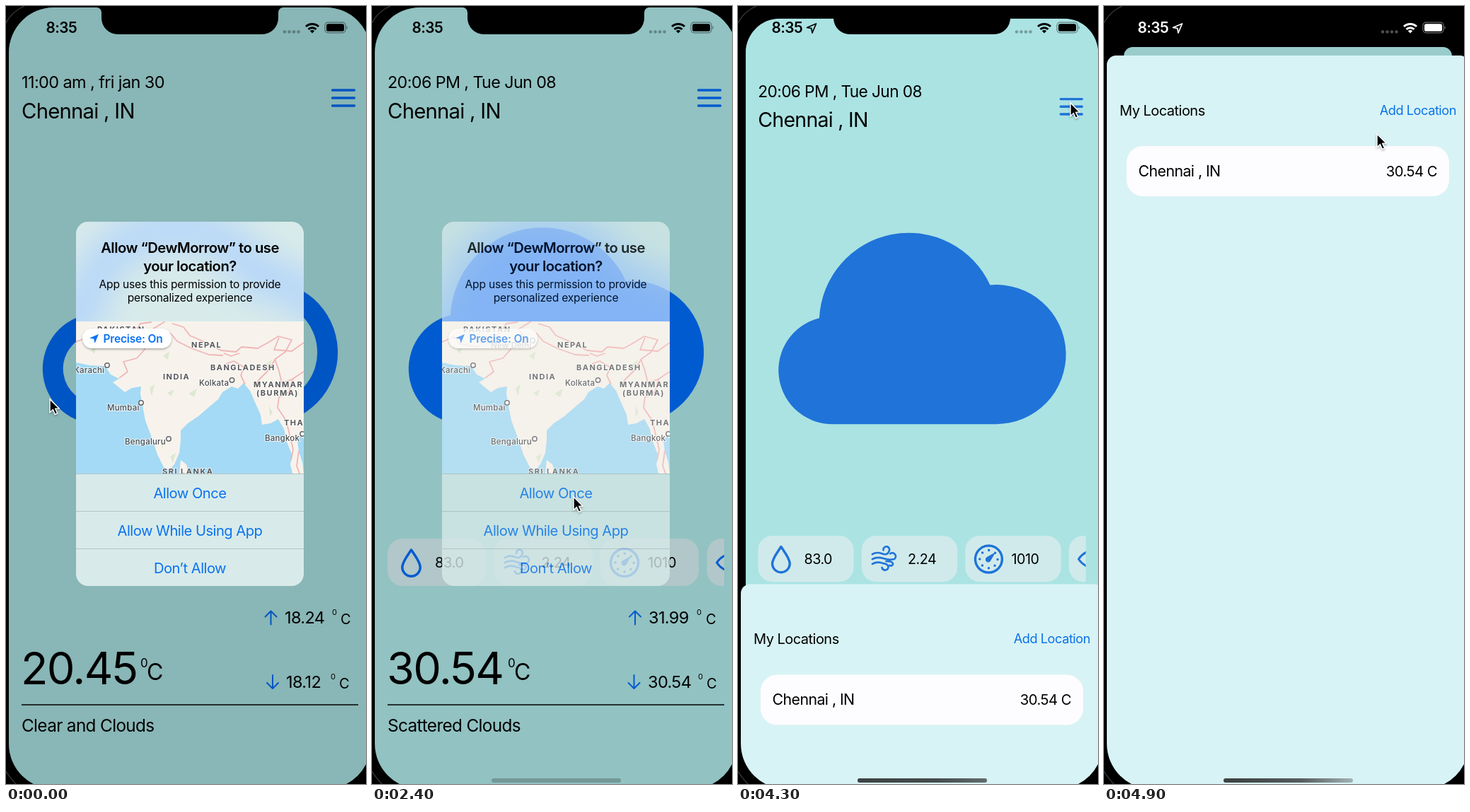
Write an HTML page that moves like this. It is 509 px wide and 1100 px high and loops after 5 s.

```html
<!DOCTYPE html>
<html lang="en">
<head>
<meta charset="utf-8">
<title>Weather app</title>
<style>
  html, body { margin: 0; width: 100%; height: 100%; overflow: hidden; background: #000; }
  svg { display: block; width: 509px; height: 1100px; font-family: Inter, sans-serif; --tint: #006fff; }
  text { letter-spacing: -.026em; white-space: pre; }
  .semi { font-weight: 600; }
  .mid { text-anchor: middle; }
  .end { text-anchor: end; }
  .small text, text.small { letter-spacing: -.012em; }
  .line { fill: none; stroke: var(--tint); stroke-linecap: round; stroke-linejoin: round; }
  .fill { fill: var(--tint); }
  .country text { font: 700 11px Inter, sans-serif; letter-spacing: 1.5px; fill: #55575a; }
  .city text { font: 500 11.5px Inter, sans-serif; letter-spacing: .2px; fill: #4b4d50; }
  .halo text { paint-order: stroke; stroke: #fff; stroke-opacity: .75; stroke-width: 2px; }
</style>
</head>
<body>
<svg viewBox="0 0 509 1100">
  <defs>
    <path id="cloud" d="M133 591A78.2 78.2 0 0 1 111 437A130 130 0 0 1 359 389A101.200 101.200 0 1 1 367 591Z"/>
    <clipPath id="cloudClip"><use href="#cloud"/></clipPath>
    <clipPath id="screenClip"><rect x="4" y="2" width="512" height="1105" rx="64"/></clipPath>
    <clipPath id="pageClip"><rect id="pageShape" x="4" y="2" width="512" height="1105"/></clipPath>
    <clipPath id="chipClip"><rect x="22" y="750" width="476" height="75"/></clipPath>
    <clipPath id="alertClip"><rect x="99" y="305" width="322" height="515" rx="17"/></clipPath>
    <clipPath id="headClip"><rect x="99" y="305" width="322" height="141"/></clipPath>
    <clipPath id="mapClip"><rect x="99" y="446" width="322" height="215"/></clipPath>
    <filter id="blur" x="-30%" y="-30%" width="160%" height="160%"><feGaussianBlur stdDeviation="26"/></filter>
    <filter id="shade" x="-50%" y="-50%" width="200%" height="200%"><feDropShadow dx="0" dy="1.5" stdDeviation="1.5" flood-opacity=".35"/></filter>
    <linearGradient id="barFade"><stop stop-color="#3c4142"/><stop offset=".6" stop-color="#565c5d"/><stop offset="1" stop-color="#a3b3b5"/></linearGradient>
    <path id="arrow" d="M0 20V1M-8 9L0 1L8 9" class="line" stroke-width="2"/>
    <path id="compass" d="M13 0L7.5 13L6.3 6.7L0 5.5Z"/>
  </defs>

  <rect width="509" height="1100"/>
  <path d="M0 24Q8 8 26 0M0 1082Q6 1092 14 1100" fill="none" stroke="#3a3a3a" stroke-width="1.2"/>

  <g id="page"><g clip-path="url(#pageClip)">
    <rect x="4" y="2" width="512" height="1105" fill="#b2ecec"/>
    <path class="line" stroke-width="3.4" d="M461.500 119H492.500M461.500 130H492.500M461.500 141H492.500"/>
    <text x="22" y="159" font-size="29.300">Chennai , IN</text>
    <path d="M22 988H498" stroke="#000" stroke-width="1.5"/>

    <g id="before">
      <g clip-path="url(#cloudClip)"><use href="#cloud" class="line" stroke-width="58"/></g>
      <text x="22" y="116" font-size="23.500">11:00 am , fri jan 30</text>
      <text x="21" y="958.500" font-size="63">20.45</text>
      <text x="190" y="935" font-size="17">0</text><text x="199" y="953" font-size="32">C</text>
      <use href="#arrow" x="374.500" y="854.500"/>
      <text x="394" y="873" font-size="23.500">18.24</text>
      <text x="461" y="861" font-size="11">0</text><text x="473" y="874" font-size="20">C</text>
      <use href="#arrow" transform="translate(377 966) scale(1 -1)"/>
      <text x="396" y="964" font-size="23.500">18.12</text>
      <text x="459" y="952" font-size="11">0</text><text x="471" y="965" font-size="20">C</text>
      <text x="22" y="1026" font-size="24.300">Clear and Clouds</text>
    </g>

    <g id="after">
      <use href="#cloud" class="fill"/>
      <text x="22" y="116" font-size="23.300">20:06 PM , Tue Jun 08</text>
      <text x="21" y="958.500" font-size="63">30.54</text>
      <text x="192" y="935" font-size="17">0</text><text x="201" y="953" font-size="32">C</text>
      <use href="#arrow" x="372" y="854.500"/>
      <text x="391" y="873" font-size="23.500">31.99</text>
      <text x="459" y="861" font-size="11">0</text><text x="472" y="874" font-size="20">C</text>
      <use href="#arrow" transform="translate(370.500 966) scale(1 -1)"/>
      <text x="390" y="964" font-size="23.500">30.54</text>
      <text x="461" y="952" font-size="11">0</text><text x="473" y="965" font-size="20">C</text>
      <text x="22" y="1026" font-size="24.300">Scattered Clouds</text>
      <g clip-path="url(#chipClip)" font-size="20.300">
        <g fill="#d8f3f5">
          <rect x="22" y="753" width="139" height="67" rx="21"/>
          <rect x="172.500" y="753" width="139" height="67" rx="21"/>
          <rect x="323" y="753" width="139" height="67" rx="21"/>
          <rect x="473.500" y="753" width="139" height="67" rx="21"/>
        </g>
        <text x="89" y="794">83.0</text><text x="239.500" y="794">2.24</text><text x="390" y="794">1010</text>
        <path class="line" stroke-width="3.500" d="M55.500 769C51 776 42.800 786 42.800 793.500A12.700 12.700 0 0 0 68.200 793.500C68.200 786 60 776 55.500 769Z"/>
        <path class="line" stroke-width="2.700" d="M188 780Q194 776 202 779T212 776A4.500 4.500 0 1 0 204 774M188 787Q195 783 204 786T220 787A5 5 0 1 0 214 779M188 794Q195 790 203 793C214 794 213 803 206 803Q202 802 202 799M208 790Q218 790 218 794A3 3 0 0 1 213 796"/>
        <circle class="line" cx="357" cy="787" r="19.500" stroke-width="3.500"/>
        <circle class="line" cx="357" cy="787" r="13" stroke-width="3.600" stroke-dasharray="0 10.210" transform="rotate(90 357 787)"/>
        <path class="fill" d="M367 777L360 789A4 4 0 1 1 354.500 784Z"/>
        <path class="line" stroke-width="3" d="M507 774Q494 777 487.500 787Q494 797 507 800"/>
      </g>
    </g>
    <rect id="pageDim" x="4" y="2" width="512" height="1105"/>
  </g></g>

  <g clip-path="url(#screenClip)">
    <g id="sheet">
      <rect x="4" width="512" height="1200" rx="13" fill="#d8f3f5"/>
      <text x="22" y="85" font-size="20">My Locations</text>
      <text x="498" y="84" font-size="18.200" class="end" fill="#0a72e8">Add Location</text>
      <rect x="32" y="128" width="456" height="71" rx="23" fill="#fdfcff"/>
      <text x="48.500" y="171" font-size="21.300">Chennai , IN</text>
      <text x="471" y="171" font-size="20.300" class="end">30.54 C</text>
    </g>
  </g>

  <path d="M128 0V2A7 7 0 0 1 135 9V17A23 23 0 0 0 158 40H362A23 23 0 0 0 385 17V9A7 7 0 0 1 392 2V0Z"/>
  <g id="status" fill="currentColor">
    <text id="clock" y="38" font-size="20.800" class="semi">8:35</text>
    <use id="here" href="#compass" x="97.500" y="25" fill="none" stroke="currentColor" stroke-width="1.700" stroke-linejoin="round"/>
    <g opacity=".3"><circle cx="394" cy="36.500" r="2.300"/><circle cx="400.500" cy="36.500" r="2.300"/><circle cx="407" cy="36.500" r="2.300"/><circle cx="413.500" cy="36.500" r="2.300"/></g>
    <g fill="none" stroke="currentColor" stroke-width="3"><path d="M424 29A13 13 0 0 1 442 29M427.500 33A8 8 0 0 1 438.500 33"/></g>
    <path d="M429.800 35.200Q433 32.800 436.200 35.200L433 38.500Z"/>
    <rect x="451" y="23.200" width="29" height="14.600" rx="4.200" fill="none" stroke="currentColor" stroke-opacity=".45" stroke-width="1.200"/>
    <rect x="453" y="25.200" width="25" height="10.600" rx="2.600"/>
    <path d="M481.500 28Q484 30.500 481.500 33Z" opacity=".5"/>
  </g>

  <rect id="dim" x="4" y="2" width="512" height="1105" clip-path="url(#screenClip)"/>
  <rect id="home" x="169" y="1092" width="183" height="6" rx="3"/>
  <rect id="homeSheet" x="169" y="1092" width="183" height="6" rx="3" fill="url(#barFade)"/>

  <rect id="mapPlate" x="99" y="446" width="322" height="215" fill="#f2f0ea"/>
  <g id="alert" clip-path="url(#alertClip)">
    <path d="M99 305H421V446H99ZM99 661H421V820H99Z" fill="#d8ebea"/>
    <g clip-path="url(#headClip)"><use id="glow" href="#cloud" stroke="#a9ceff" stroke-width="40" filter="url(#blur)"/></g>
    <g class="mid">
      <g font-size="20.300" class="semi"><text x="260" y="349">Allow “DewMorrow” to use</text><text x="260" y="375">your location?</text></g>
      <g font-size="15.600" class="small"><text x="260" y="399">App uses this permission to provide</text><text x="260" y="418">personalized experience</text></g>
    </g>
    <g clip-path="url(#mapClip)">
      <rect x="99" y="446" width="322" height="215" fill="#a4daf5"/>
      <path fill="#f7f3ec" d="M99 446H421V612L417 608L412 614L414 630L419 645L421 661H405L402 648L405 636L397 616L393 598L385 584L374 590L362 592L360 578L352 560L345 544L336 533L328 541L319 538L306 546L300 556L287 567L272 580L257 590L247 600L247 614L245 632L238 648L231 656L223 652L214 634L206 610L197 586L193 565L190 548L191 538L178 540L168 546L151 532L160 527L148 521L140 509L118 508L99 504ZM247 642L255 648L259 661H245Z"/>
      <path fill="#d4e6c8" opacity=".75" d="M203 540L210 535L206 552ZM228 547L237 542L234 552ZM232 637L240 632L236 646ZM217 612L223 616L221 626ZM222 495L231 488L229 500ZM258 548L270 541L266 553ZM365 508L376 500L372 514ZM120 487L127 482L125 492ZM372 565L377 575L373 580Z"/>
      <g fill="none" stroke="#f0b6b7" stroke-width="1.800" stroke-linejoin="round">
        <path d="M160 526L172 517L166 503L185 498L199 482L217 470L207 457L225 446M99 475L116 468L124 478L150 482L163 468L180 464L190 449L206 447M232 462L242 474L262 484L287 493L307 494M235 449L251 454L260 466L279 474L304 487L325 489L333 482L356 484L372 475L385 467L404 472L395 489L381 499L370 516L358 528L351 538"/>
        <path d="M311 506L322 502L337 511L332 522L338 535M308 491L318 495L330 491M386 469L379 486L404 488L421 476M380 499L386 516L390 533L404 528L421 517M405 528L400 546L386 553L384 568L396 586L401 606L406 627L403 642M414 629L411 650L415 661"/>
      </g>
      <g class="country halo">
        <text x="129" y="461">PAKISTAN</text><text x="262" y="483">NEPAL</text><text x="222" y="528">INDIA</text>
        <text x="289" y="515">BANGLADESH</text><text x="350" y="539">MYANMAR</text><text x="354" y="551">(BURMA)</text>
        <text x="393" y="593">THA</text><text x="221" y="662">SRI LANKA</text>
      </g>
      <g class="city halo">
        <text x="96" y="519">Karachi</text><text x="273" y="537">Kolkata</text><text x="143" y="572">Mumbai</text>
        <text x="168" y="620">Bengaluru</text><text x="366" y="615">Bangkok</text><text x="168" y="484">New Delhi</text>
      </g>
      <g fill="#fff" stroke="#66686b" stroke-width="1.500">
        <circle cx="143" cy="508" r="3.200"/><circle cx="319.500" cy="529" r="3.200"/><circle cx="191" cy="561" r="3.200"/>
        <circle cx="230" cy="612" r="3.200"/><circle cx="419" cy="605" r="3.200"/><circle cx="227" cy="473" r="3.200"/>
      </g>
    </g>
    <g id="pill">
      <rect x="108" y="456" width="126" height="28" rx="14" fill="#fff" filter="url(#shade)"/>
      <g fill="#0a72f5"><use href="#compass" x="118" y="464"/><text x="137.500" y="475.500" font-size="15.500" class="semi small">Precise: On</text></g>
    </g>
    <path d="M99 661.500H421M99 714.500H421M99 767.500H421" stroke="#b4c4c4"/>
    <g class="mid" fill="#0a72f0" font-size="20.200">
      <text x="260" y="696">Allow Once</text><text x="260" y="749">Allow While Using App</text><text x="260" y="802">Don’t Allow</text>
    </g>
  </g>

  <path id="cursor" d="M0 0V18.500L4.400 14.600L7.300 21.300L10.600 19.800L7.700 13.400L13 13Z" stroke="#fff" stroke-width="1.400" filter="url(#shade)"/>
</svg>
<script>
const LOOP = 5000, STEP = 100;
const DATA_AT = 1500, SHEET_AT = 4243, SPRING = 0.01826;
const TINT = [0, 111, 255], TINT_OFF = [118, 144, 146];
// Cursor stops: time, x, y
const CURSOR = [[600, 62, 556], [1600, 283, 696], [1900, 283, 696], [2200, 285, 694], [2900, 285, 694],
  [3600, 444, 153], [3700, 444, 153], [4100, 470, 137], [4500, 470, 137], [4900, 386, 181]];

const svg = document.querySelector('svg');
const el = Object.fromEntries([...svg.querySelectorAll('[id]')].map(e => [e.id, e]));
const mix = (a, b, p) => a + (b - a) * p;
const ramp = (t, from, to) => Math.min(1, Math.max(0, (t - from) / (to - from)));
const smooth = p => p * p * (3 - 2 * p);
const fade = (node, value) => node.setAttribute('opacity', value);
const show = (node, on) => { node.style.display = on ? '' : 'none'; };

function cursorAt(t) {
  const i = CURSOR.findIndex(stop => stop[0] > t);
  if (i === 0) return CURSOR[0].slice(1);
  if (i < 0) return CURSOR.at(-1).slice(1);
  const a = CURSOR[i - 1], b = CURSOR[i], p = smooth(ramp(t, a[0], b[0]));
  return [mix(a[1], b[1], p), mix(a[2], b[2], p)];
}

function draw(t) {
  const loaded = t >= DATA_AT;
  show(el.before, !loaded);
  show(el.after, loaded);

  const gone = smooth(ramp(t, 2310, 2610));
  show(el.alert, gone < 1);
  fade(el.alert, 1 - gone);
  fade(el.mapPlate, 1 - gone ** 3);
  fade(el.pill, 1 - gone);
  el.glow.setAttribute('fill', loaded ? '#a9ceff' : 'none');
  fade(el.dim, 0.23 * (1 - gone));

  // Critically damped spring for the sheet and the page behind it
  const w = SPRING * Math.max(0, t - SHEET_AT);
  const p = 1 - (1 + w) * Math.exp(-w);
  el.sheet.setAttribute('transform', `translate(0 ${mix(1107, 70, p)})`);
  el.page.setAttribute('transform', `translate(260 ${mix(2, 58, p)}) scale(${1 - 0.094 * p}) translate(-260 -2)`);
  el.pageShape.setAttribute('rx', mix(64, 14, p));
  fade(el.pageDim, 0.137 * p);
  svg.style.setProperty('--tint', `rgb(${TINT.map((c, i) => mix(c, TINT_OFF[i], p))})`);
  fade(el.home, gone * (1 - p));
  fade(el.homeSheet, Math.min(1, 1.3 * p));

  el.clock.setAttribute('x', mix(56.5, 47.5, ramp(t, 2550, 2745)));
  fade(el.here, ramp(t, 2680, 2880));
  const level = 255 * ramp(t, 4340, 4560);
  el.status.style.color = `rgb(${level},${level},${level})`;

  el.cursor.setAttribute('transform', `translate(${cursorAt(t)})`);
}

const start = performance.now();
function tick() {
  const t = (performance.now() - start) % LOOP;
  draw(Math.floor(t / STEP) * STEP);
  requestAnimationFrame(tick);
}
tick();
</script>
</body>
</html>
```
